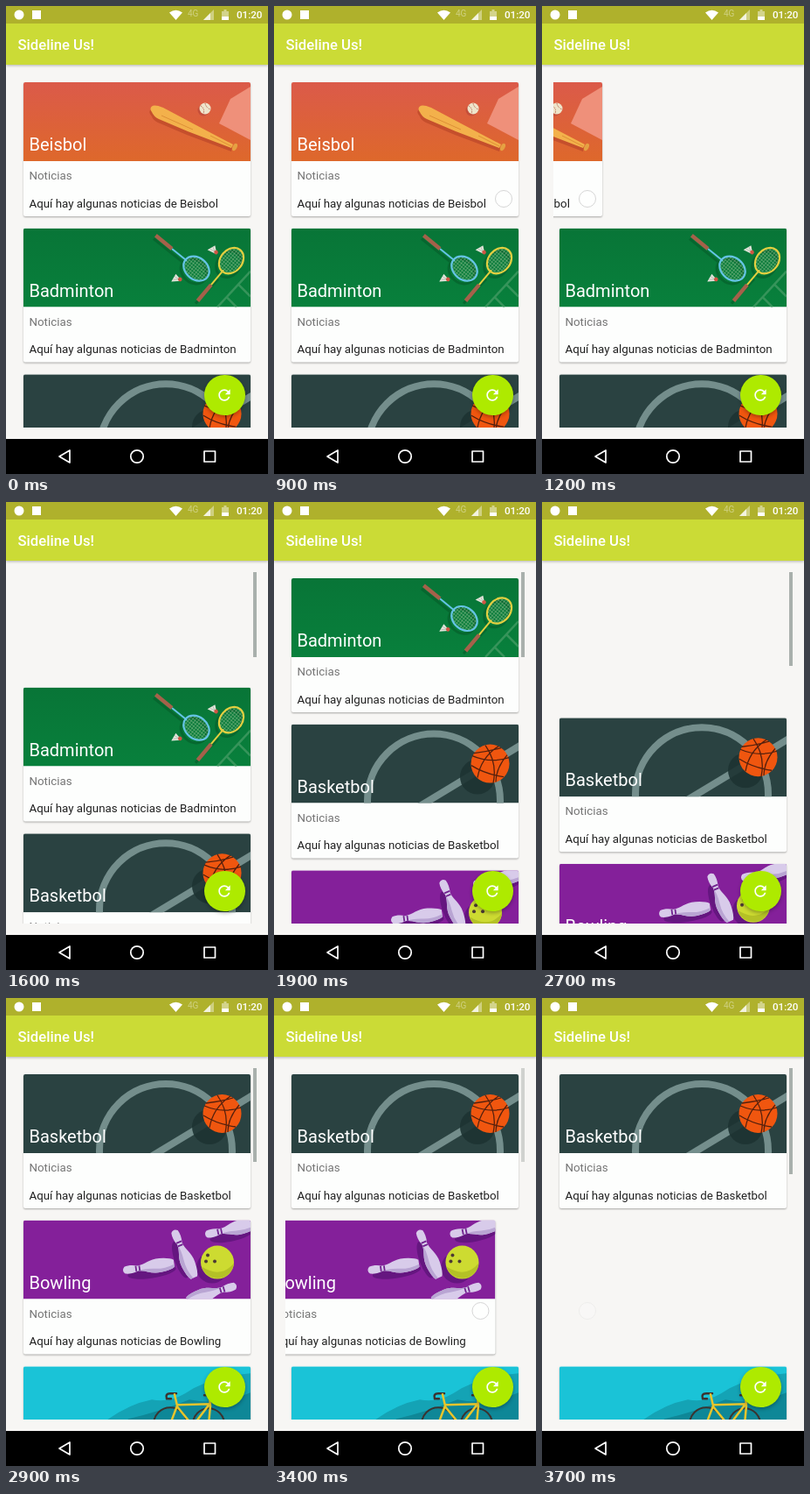
Recreate the animation shown at these times as an HTML page. Size 300 by 534 pixels, loop 3.8 s.

```html
<!DOCTYPE html>
<html lang="es">
<head>
<meta charset="utf-8">
<title>Sports cards</title>
<style>
  html, body { margin: 0; width: 100%; height: 100%; overflow: hidden; background: #f7f6f4; }
  body { position: relative; font-family: Roboto, sans-serif; }
  svg { display: block; }
  #stage { position: absolute; left: 0; top: 0; width: 300px; height: 534px; overflow: hidden; }
  #stage > * { position: absolute; }
  #list { left: 13px; top: 80px; width: 274px; height: 400.5px; overflow: hidden; }
  .card {
    position: absolute; left: 7px; top: 7px; width: 260px; height: 153px;
    border-radius: 2px; overflow: hidden; background: #fdfefd;
    box-shadow: 0 1px 2px rgba(0, 0, 0, .32);
  }
  .name { font-size: 20px; fill: #fff; }
  .label { font-size: 13.33px; fill: #757575; }
  .info { font-size: 13.33px; fill: #212121; }
  #thumb { left: 283px; top: 80px; width: 4px; background: #a9b0ac; }
  #bar { left: 0; top: 0; width: 300px; height: 67px; background: #cbdb36; box-shadow: 0 1px 3px rgba(0, 0, 0, .28); }
  #fab { left: 227px; top: 420.5px; width: 46.6px; height: 46.6px; border-radius: 50%; background: #aeea00; box-shadow: 0 2px 4px rgba(0, 0, 0, .3); }
  #fab svg { margin: 13.3px; }
  #nav { left: 0; top: 494px; }
  #touch {
    left: 253px; width: 18px; height: 18px; border-radius: 50%;
    border: 1.5px solid #d6d6d6; background: rgba(255, 255, 255, .6);
  }
</style>
</head>
<body>
<svg width="0" height="0" style="position:absolute">
  <defs>
    <linearGradient id="clay" x2="0" y2="1">
      <stop stop-color="#db5a4a"/><stop offset="1" stop-color="#de682b"/>
    </linearGradient>
    <linearGradient id="grass" x2="0" y2="1">
      <stop stop-color="#087537"/><stop offset="1" stop-color="#08803c"/>
    </linearGradient>
    <pattern id="net" width="3" height="3" patternUnits="userSpaceOnUse">
      <path d="M0 0H3M0 0V3" stroke="#d5e5bd" stroke-width=".8" opacity=".75"/>
    </pattern>

    <symbol id="Beisbol" viewBox="0 0 260 90">
      <path fill="url(#clay)" d="M0 0H260V90H0z"/>
      <path fill="#ef907a" d="M260 5 237 19 224 47 260 66z"/>
      <path id="bat" fill="#c54f2c" d="M148 36Q143 31 147 28Q150 25 160 29L194 47 240 70 239 76 188 57 155 43Q149 40 148 36z" transform="translate(-1 3)"/>
      <path fill="#f3b14b" d="M147 34Q144 30 147 27.500Q150 25 160 29L194 47 240 71 238 75 188 56 155 42Q149 39 147 34z"/>
      <path stroke="#dd8f36" stroke-width="1" d="M158 38 194 54M214 61 238 73"/>
      <ellipse cx="242" cy="74" rx="2.500" ry="4.500" fill="#e5a142" transform="rotate(25 242 74)"/>
      <circle cx="206" cy="32" r="6.500" fill="#c54f3a"/>
      <circle cx="208" cy="30" r="6.500" fill="#eee5cb"/>
      <path fill="none" stroke="#b96650" stroke-dasharray="1.500 1" d="M203 27Q208 30 206 36M208 24Q209 29 214 31"/>
    </symbol>

    <symbol id="racket" viewBox="-30 -75 60 110" overflow="visible">
      <path stroke="currentColor" stroke-width="2" d="M0 14V36"/>
      <path stroke="#a5614a" stroke-width="4.500" d="M0 36V60"/>
      <ellipse rx="12.500" ry="16" fill="url(#net)" stroke="currentColor" stroke-width="2.200"/>
    </symbol>
    <g id="shuttle">
      <path fill="#e4e6dc" d="M-5-4 5-3 2 4 0 5z"/>
      <path stroke="#a9b7a8" stroke-width=".7" d="M-2-3 1 3M2-3 1 3"/>
      <circle cx="1.500" cy="4" r="2.300" fill="#cf5643"/>
    </g>
    <symbol id="Badminton" viewBox="0 0 260 90">
      <path fill="url(#grass)" d="M0 0H260V90H0z"/>
      <path stroke="#36945a" stroke-width="2.500" d="M222 90 260 49M232 78 244 90M246 64 260 78"/>
      <g fill="none" stroke="#06602c" stroke-width="3" opacity=".7">
        <path d="M149 12 184 40M197 86 223 58"/>
        <ellipse cx="195" cy="49" rx="13" ry="16" transform="rotate(-50 195 49)"/>
        <ellipse cx="235" cy="41" rx="13" ry="16" transform="rotate(40 235 41)"/>
      </g>
      <use href="#racket" x="-30" y="-75" width="60" height="110" color="#65c4e6" transform="translate(198 46) rotate(129)"/>
      <use href="#racket" x="-30" y="-75" width="60" height="110" color="#e3cf40" transform="translate(238 37) rotate(40)"/>
      <use href="#shuttle" transform="translate(217 25) rotate(-35)"/>
      <use href="#shuttle" transform="translate(175 58) rotate(-65)"/>
    </symbol>

    <symbol id="Basketbol" viewBox="0 0 260 90">
      <path fill="#2a4241" d="M0 0H260V90H0z"/>
      <g fill="none" stroke="#748e8c" stroke-width="8">
        <circle cx="163" cy="87" r="76"/>
        <path d="M146 94 264 23"/>
      </g>
      <circle cx="213" cy="60" r="20" fill="#1d3332" opacity=".9"/>
      <circle cx="227.500" cy="45" r="22" fill="#f0560f"/>
      <path fill="none" stroke="#55200d" stroke-width="1.300" d="M207 36Q228 45 249 38M206 47Q222 57 243 60M222 24Q236 44 231 67M237 25Q217 38 213 61M209 33Q226 31 240 27M247 35Q234 50 234 66"/>
    </symbol>

    <g id="pin">
      <path fill="#d8cbea" d="M0-4C4-5 9-5 15-3C24-3 29-9 41-8Q53-7 57-4V4Q53 7 41 8C29 9 24 3 15 3C9 5 4 5 0 4Q-4 0 0-4z"/>
      <path fill="#b9a5d3" d="M15 3C24 3 29 9 41 8Q53 7 57 4V1Q45 5 34 3Q22 1 15 3z"/>
      <path stroke="#71238f" stroke-width="1.800" d="M13-3.200V3.200M17-3V3"/>
    </g>
    <symbol id="Bowling" viewBox="0 0 260 90">
      <path fill="#84209a" d="M0 0H260V90H0z"/>
      <g fill="#651680">
        <ellipse cx="147" cy="59" rx="28" ry="7" transform="rotate(-9 147 59)"/>
        <ellipse cx="180" cy="45" rx="7" ry="22" transform="rotate(-20 180 45)"/>
        <circle cx="216" cy="54" r="18"/>
        <ellipse cx="238" cy="17" rx="25" ry="7" transform="rotate(-12 238 17)"/>
      </g>
      <use href="#pin" transform="translate(116 57) rotate(-8)"/>
      <use href="#pin" transform="translate(173 13) rotate(67)"/>
      <use href="#pin" transform="translate(210 16) rotate(-12)"/>
      <use href="#pin" transform="translate(242 75) rotate(163)"/>
      <circle cx="222" cy="48" r="19" fill="#cddb31"/>
      <path fill="#b4c126" d="M204 53A19 19 0 0 0 241 49Q226 67 204 53z"/>
      <g fill="#4c3b34"><circle cx="211" cy="40" r="2"/><circle cx="209" cy="47" r="2"/><circle cx="219" cy="47" r="2"/></g>
    </symbol>

    <symbol id="Ciclismo" viewBox="0 0 260 90">
      <path fill="#1ac3d7" d="M0 0H260V90H0z"/>
      <path fill="#14a3b5" d="M96 61Q121 43 147 38Q166 42 185 31Q212 12 260 8V90H60z"/>
      <path fill="#0e8797" d="M120 60Q155 52 190 38Q225 45 260 30V90H100z"/>
      <g fill="none" stroke-linecap="round">
        <g stroke="#3a3431" stroke-width="2">
          <circle cx="168" cy="66" r="19"/><circle cx="212" cy="66" r="18"/>
          <path stroke-width="2.500" d="M169 37H164Q162 31 168 31H175M207 33H220"/>
        </g>
        <path stroke="#e8c52c" stroke-width="2.500" d="M173 32 176 45 168 66M176 44 213 43 194 68 176 46M213 36 214 45 212 66 194 68"/>
      </g>
    </symbol>
  </defs>
</svg>

<div id="stage">
  <div id="list"></div>
  <div id="thumb"></div>
  <svg id="bar" viewBox="0 0 300 67">
    <path fill="#afb12c" d="M0 0H300V20H0z"/>
    <g fill="#fff">
      <circle cx="15" cy="10" r="5.500"/>
      <path d="M30 5H40V15H30z"/>
      <path d="M187 7.500Q194.500 2 202 7.500L194.500 16z"/>
      <text x="208" y="11.500" font-size="10" opacity=".4">4G</text>
      <path opacity=".4" d="M238 4V16H226z"/>
      <path d="M234 8V16H226z" opacity=".75"/>
      <path opacity=".45" d="M247 6H249.500V4H252.500V6H255V16H247z"/>
      <path d="M247 12H255V16H247z"/>
      <text x="293.500" y="14" font-size="11.670" font-weight="500" text-anchor="end">01:20</text>
      <text x="13.500" y="50" font-size="16.670" font-weight="500">Sideline Us!</text>
    </g>
  </svg>
  <div id="fab">
    <svg width="20" height="20" viewBox="0 0 24 24"><path fill="#fff" d="M17.650 6.350C16.200 4.900 14.210 4 12 4c-4.420 0-8 3.580-8 8s3.580 8 8 8c3.730 0 6.840-2.550 7.730-6h-2.080c-.82 2.330-3.040 4-5.650 4-3.310 0-6-2.690-6-6s2.690-6 6-6c1.660 0 3.140.69 4.220 1.780L13 11h7V4z"/></svg>
  </div>
  <div id="touch"></div>
  <svg id="nav" width="300" height="40">
    <path d="M0 0H300V40H0z"/>
    <g fill="none" stroke="#fff" stroke-width="1.700" stroke-linejoin="round">
      <path d="M73 13V27L61 20z"/>
      <circle cx="150" cy="20" r="7.200"/>
      <path d="M227 14H239.500V26H227z"/>
    </g>
  </svg>
</div>

<script>
  const LOOP = 3800, STEP = 100, PITCH = 166.6;
  const names = ['Beisbol', 'Badminton', 'Basketbol', 'Bowling', 'Ciclismo'];
  const swipes = [
    { card: 0, start: 900, y: 220 },
    { card: 1, start: 2200, y: 218 },
    { card: 3, start: 3300, y: 357 }
  ];
  const lifts = [{ after: 0, start: 1523 }, { after: 1, start: 2669 }];
  const bars = [
    { from: 1400, fade: 2200, size: 97 },
    { from: 2600, fade: 3300, size: 107 },
    { from: 3700, fade: LOOP, size: 121 }
  ];

  const $ = id => document.getElementById(id);
  const ramp = (t, start, span) => Math.min(1, Math.max(0, (t - start) / span));
  const ease = p => (1 - Math.cos(Math.PI * p)) / 2;

  const cards = names.map(name => {
    const el = document.createElement('div');
    el.className = 'card';
    el.innerHTML = `<svg width="260" height="153">
      <use href="#${name}" width="260" height="90"/>
      <text class="name" x="6.500" y="78">${name}</text>
      <text class="label" x="6.500" y="111">Noticias</text>
      <text class="info" x="6.500" y="142.500">Aquí hay algunas noticias de ${name}</text>
    </svg>`;
    $('list').append(el);
    return el;
  });

  // Drag with the finger, then slide off the edge.
  const drag = (t, start) => -211 * ease(ramp(t, start + 40, 260));
  const fling = (t, start) => -70 * ramp(t, start + 300, 100);

  function draw() {
    const now = performance.now() % LOOP;
    const t = Math.floor((now + 5) / STEP) * STEP % LOOP;

    cards.forEach((el, i) => {
      const swipe = swipes.find(s => s.card === i);
      const x = swipe ? drag(t, swipe.start) + fling(t, swipe.start) : 0;
      const lifted = lifts.reduce((sum, l) => sum + (i > l.after ? ease(ramp(t, l.start, 230)) : 0), 0);
      el.style.transform = `translate(${x}px, ${PITCH * (i - lifted)}px)`;
      el.style.visibility = x < -270 ? 'hidden' : 'visible';
    });

    const bar = bars.find(b => t >= b.from && t < b.fade + 200);
    $('thumb').style.opacity = bar ? 1 - ramp(t, bar.fade, 200) : 0;
    if (bar) $('thumb').style.height = bar.size + 'px';

    const active = swipes.find(s => t >= s.start && t < s.start + 450);
    const touch = $('touch').style;
    touch.opacity = active ? 1 - ramp(t, active.start + 300, 140) : 0;
    if (active) {
      touch.top = active.y - 10.5 + 'px';
      touch.transform = `translateX(${drag(t, active.start)}px)`;
    }
    requestAnimationFrame(draw);
  }
  draw();
</script>
</body>
</html>
```
